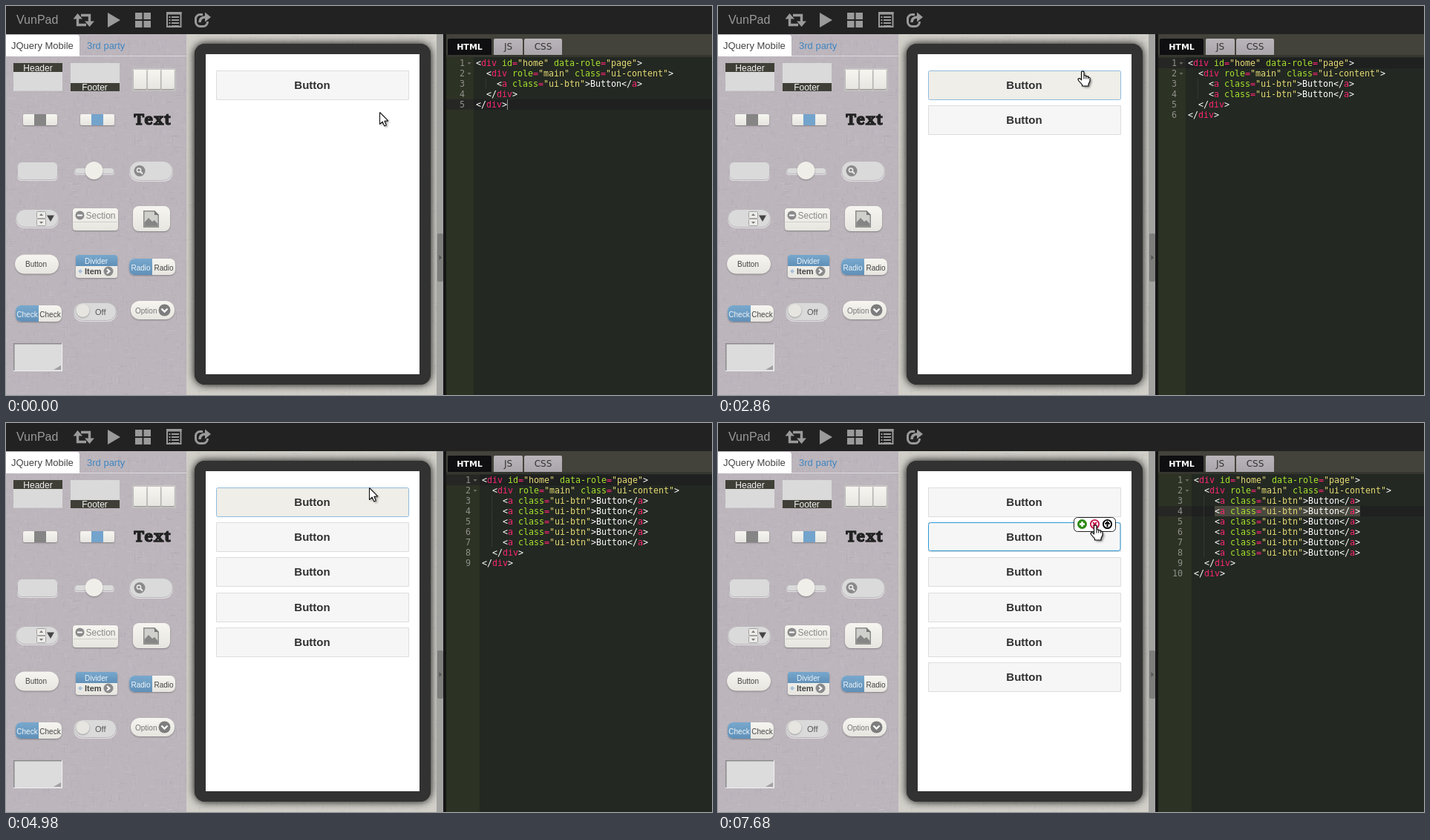
An HTML page with a canvas for the animation above (8 s loop, 951 px wide and 525 px high).

```html
<!DOCTYPE html>
<html lang="en">
<head>
<meta charset="utf-8">
<title>App builder</title>
<style>
html, body { margin: 0; width: 100%; height: 100%; overflow: hidden; background: #222; }
canvas { display: block; width: 100vw; height: 100vh; }
</style>
</head>
<body>
<canvas id="stage" width="951" height="525"></canvas>
<script>
const W = 951, H = 525, LOOP = 8000, TICK = 60;
const SANS = '"Liberation Sans", Arial, sans-serif';
const MONO = '11.63px "DejaVu Sans Mono", monospace';
const CREAM = '#efeee8', BLUE = '#2a97d6', GREY = '#8a8a8a';
const stage = document.getElementById('stage').getContext('2d');
let g = stage;

// ---------- drawing helpers ----------
function rect(x, y, w, h, fill) { g.fillStyle = fill; g.fillRect(x, y, w, h); }

function round(x, y, w, h, r, fill, line) {
  g.beginPath();
  g.roundRect(x, y, w, h, r);
  if (fill) { g.fillStyle = fill; g.fill(); }
  if (line) { g.strokeStyle = line; g.lineWidth = 1; g.stroke(); }
}

function disc(x, y, r, fill, line, width = 1) {
  g.beginPath();
  g.arc(x, y, r, 0, Math.PI * 2);
  if (fill) { g.fillStyle = fill; g.fill(); }
  if (line) { g.strokeStyle = line; g.lineWidth = width; g.stroke(); }
}

function trace(points) {
  g.beginPath();
  points.forEach(([x, y]) => g.lineTo(x, y));
}

function poly(points, fill) { trace(points); g.closePath(); g.fillStyle = fill; g.fill(); }

function stroke(points, color, width) {
  trace(points);
  g.strokeStyle = color;
  g.lineWidth = width;
  g.stroke();
}

function text(str, x, y, font, color, align = 'left') {
  g.font = font;
  g.fillStyle = color;
  g.textAlign = align;
  g.fillText(str, x, y);
}

const label = (str, x, y, size, color, align) => text(str, x, y, `${size}px ${SANS}`, color, align);

function vertical(y0, y1, ...colors) {
  const fill = g.createLinearGradient(0, y0, 0, y1);
  colors.forEach((c, i) => fill.addColorStop(i / (colors.length - 1), c));
  return fill;
}

function shadowed(color, blur, dx, dy, draw) {
  g.save();
  g.shadowColor = color;
  g.shadowBlur = blur;
  g.shadowOffsetX = dx;
  g.shadowOffsetY = dy;
  draw();
  g.restore();
}

// ---------- fixed scenery ----------
function linen(x, y, w, h, base, seed) {
  const rnd = () => (seed = (seed * 16807) % 2147483647) / 2147483647;
  rect(x, y, w, h, base);
  g.save();
  g.beginPath();
  g.rect(x, y, w, h);
  g.clip();
  for (let i = 0; i < w * h / 45; i++) {
    const tone = rnd() < 0.5 ? 'rgba(255,255,255,.07)' : 'rgba(90,80,95,.05)';
    const len = 2 + rnd() * 7, flat = rnd() < 0.5;
    rect(x + Math.floor(rnd() * w), y + Math.floor(rnd() * h), flat ? len : 1, flat ? 1 : len, tone);
  }
  g.restore();
}

function topBar() {
  const ink = '#9a9a9a';
  rect(0, 0, W, 38, '#222222');
  label('VunPad', 14, 24, 16, ink);
  stroke([[96.5, 16], [96.5, 25.5], [108, 25.5]], ink, 3.4);
  poly([[96.5, 10], [103, 17.5], [90.5, 17.5]], ink);
  stroke([[101, 12.5], [112.5, 12.5], [112.5, 21]], ink, 3.4);
  poly([[112.5, 28], [106, 20.5], [119, 20.5]], ink);
  poly([[137, 9], [154, 19], [137, 29]], ink);
  for (const x of [174, 185.5]) for (const y of [9, 20]) rect(x, y, 9.5, 9, ink);
  g.strokeStyle = ink;
  g.lineWidth = 2;
  g.strokeRect(217, 9, 18.5, 19);
  rect(216, 8, 20.5, 3.5, ink);
  for (let y = 14; y < 27; y += 4) {
    rect(219.5, y, 2, 2, ink);
    rect(223, y, 10, 2, ink);
  }
  g.beginPath();
  g.moveTo(265, 11.5);
  g.arcTo(255.5, 11.5, 255.5, 20, 6);
  g.arcTo(255.5, 27.5, 263, 27.5, 6);
  g.arcTo(271.5, 27.5, 271.5, 20, 6);
  g.lineTo(271.5, 21);
  g.lineWidth = 3;
  g.stroke();
  g.beginPath();
  g.moveTo(261, 22);
  g.quadraticCurveTo(261, 15, 269, 15);
  g.lineWidth = 3.6;
  g.stroke();
  poly([[268, 8.5], [276, 15], [268, 21.5]], ink);
}

function raised(x, y, w, h, r) {
  shadowed('rgba(0,0,0,.3)', 2, 0, 1, () => round(x, y, w, h, r, vertical(y, y + h, '#f6f5f0', '#e6e5df')));
}

function sunken(x, y, w, h, r) {
  round(x, y + 1, w, h, r, 'rgba(255,255,255,.6)');
  round(x + .5, y + .5, w - 1, h - 1, r, '#dadada', '#b9b6b9');
}

function slimBar(x, middle) {
  raised(x, 146, 46, 15, 2);
  rect(x + 15, 146, 16, 15, middle);
}

function pair(x, y, word) {
  raised(x, y, 62, 22, 7);
  round(x, y, 31, 22, [7, 0, 0, 7], vertical(y, y + 22, '#78a8cd', '#6090b8'));
  label(word, x + 15.5, y + 15.5, 10, '#eef4f8', 'center');
  label(word, x + 46.5, y + 15.5, 10, '#444', 'center');
}

function slabWord() {
  g.save();
  g.letterSpacing = '1px';
  text('Text', 197.5, 160, '900 20.5px "Noto Serif", serif', '#222', 'center');
  g.strokeStyle = '#222';
  g.lineWidth = 1.5;
  g.strokeText('Text', 197.5, 160);
  g.restore();
}

function palette() {
  linen(0, 38, 243, 487, '#bcb5bc', 7);
  rect(0, 67, 243, 1, '#dcd9dc');
  round(0, 39, 99, 29, [0, 4, 0, 0], '#fff');
  label('JQuery Mobile', 7, 58, 13, '#444');
  label('3rd party', 109, 58, 13, '#3f86c0');

  for (const x of [10, 87]) {
    rect(x, 77, 66, 38, '#dadada');
    rect(x, 114, 66, 1, '#cfcccf');
  }
  rect(10, 77, 66, 12, '#3f3f37');
  label('Header', 43, 88, 12, '#f4f4f4', 'center');
  rect(87, 104, 66, 11, '#3f3f37');
  label('Footer', 119.5, 114, 12, '#f4f4f4', 'center');
  round(170, 84, 59, 31, 2, '#c9c7c6');
  for (let i = 0; i < 3; i++) raised(172 + i * 18.7, 86, 17.5, 26, 1);

  slimBar(23, '#858585');
  slimBar(100, '#73a4cc');
  slabWord();

  sunken(15, 210, 55, 25, 6);
  sunken(92, 218, 54, 9, 4);
  shadowed('rgba(0,0,0,.3)', 2, 0, 1, () => disc(118.5, 222, 12, CREAM));
  sunken(166, 209, 59, 27, 13);
  disc(180, 222.5, 7.5, GREY);
  disc(179, 221.5, 2.6, null, '#eee', 1.5);
  stroke([[181, 223.5], [184, 226.5]], '#eee', 2);

  sunken(13, 274, 58, 25, 12);
  for (const y of [277, 287]) {
    round(41.5, y + .5, 12, 9, 1, '#ecebe7', '#a5a3a5');
    const d = y === 277 ? 1 : -1;
    poly([[45, y + 5 + d], [50, y + 5 + d], [47.5, y + 5 - 2 * d]], '#777');
  }
  poly([[55, 282.5], [65, 282.5], [60, 291]], '#444');
  raised(90, 273, 61, 30, 4);
  rect(91, 291, 59, 1, '#cfcec9');
  disc(99.5, 282.5, 6, GREY);
  rect(96, 281.5, 7, 2, '#fff');
  label('Section', 107.5, 287, 12, '#888');
  raised(171, 270, 50, 34, 8);
  poly([[185, 276], [200, 276], [206, 282], [206, 299], [185, 299]], '#8b8b8b');
  poly([[186.5, 277.5], [199, 277.5], [204.5, 283], [204.5, 297.5], [186.5, 297.5]], '#cfcfcc');
  poly([[186.5, 297.5], [186.5, 292], [192, 286], [197, 291], [200, 289], [204.5, 294], [204.5, 297.5]], '#858585');
  poly([[200, 276], [206, 282], [200, 282]], '#777');

  raised(12, 335.5, 59, 26, 13);
  label('Button', 40.5, 352, 10, '#444', 'center');
  raised(94, 336, 56, 31, 3);
  round(94, 336, 56, 15, [3, 3, 0, 0], vertical(336, 351, '#77a7cc', '#6090b8'));
  label('Divider', 121.5, 348, 10, '#eef4f8', 'center');
  poly([[97, 358], [100, 355], [103, 358], [100, 361]], '#a9bfd9');
  text('Item', 106, 362, `bold 11px ${SANS}`, '#444');
  disc(138, 358, 6.5, GREY);
  stroke([[136, 355], [139.5, 358], [136, 361]], '#fff', 2);
  pair(166, 341, 'Radio');

  pair(13, 404, 'Check');
  sunken(91, 400, 58, 25, 12);
  shadowed('rgba(0,0,0,.3)', 2, 0, 1, () => disc(103.5, 411, 9, '#e6e5e0'));
  label('Off', 120, 417, 11, '#555');
  raised(168, 398, 59, 25, 12);
  label('Option', 174, 414.5, 10, '#777');
  disc(213.5, 410.5, 8, '#7d7d7d');
  stroke([[209.5, 408.5], [213.5, 412.5], [217.5, 408.5]], '#fff', 2.4);

  rect(10, 455, 66, 38, '#f0eff0');
  rect(10, 455, 65, 37, '#8c898c');
  rect(11.5, 456.5, 63.5, 35.5, '#dcdcdc');
  poly([[74, 485], [74, 491], [64, 491]], '#a3a0a3');
}

function device() {
  linen(243, 38, 338, 487, '#d1cfc8', 99);
  shadowed('#000', 12, 0, 0, () => round(254, 51, 318, 460, 14, '#333'));
  round(254, 51, 318, 460, 14, '#323232');
  rect(269, 65, 288, 432, '#fff');
  rect(580, 38, 10, 487, '#a2a2a0');
  round(581, 307, 8, 65, 2, '#7d7d7b');
  poly([[583.5, 336], [587, 339.5], [583.5, 343]], '#555');
  rect(589, 38, 4, 487, '#161616');
}

function editorTab(x, w, name, active) {
  round(x, 44, w, 22, [2, 2, 0, 0], active ? '#0f0f12' : vertical(44, 66, '#bab5ba', '#aaa5aa'));
  const font = active ? 'bold 11px' : '12px';
  text(name, x + w / 2, 59, `${font} "DejaVu Sans", sans-serif`, active ? '#fff' : '#333', 'center');
}

function editorFrame() {
  rect(593, 38, W - 593, 32, '#43433b');
  rect(593, 66, W - 593, 3, '#35362f');
  editorTab(595, 59, 'HTML', true);
  editorTab(657, 39, 'JS');
  editorTab(698, 51, 'CSS');
  rect(593, 69, W - 593, H - 69, '#232822');
}

const scenery = document.createElement('canvas');
scenery.width = W;
scenery.height = H;
g = scenery.getContext('2d');
topBar();
palette();
device();
editorFrame();
g = stage;

// ---------- timeline ----------
const steps = [[0, { x: 503, y: 143, hand: 0, n: 1, line: 5, sel: -1, hover: -1, focus: -1, saving: 0 }]];
const at = (t, patch) => steps.push([t, patch]);

function move(t, count, from, to, extra) {
  for (let i = 1; i <= count; i++) {
    const k = i / count;
    const x = Math.round(from[0] + (to[0] - from[0]) * k);
    const y = Math.round(from[1] + (to[1] - from[1]) * k);
    at(t + (i - 1) * TICK, { x, y, ...extra(y) });
  }
}

function duplicate(t, n) {
  at(t, { n, sel: -1, line: 1, hover: 0, focus: 0, saving: 0 });
  at(t + TICK, { sel: 0, line: 3, hand: 0 });
}

move(530, 6, [503, 143], [484, 110], y => ({ hover: y < 127 ? 0 : -1 }));
at(1490, { focus: 0 });
at(1550, { sel: 0, line: 3 });
at(2080, { x: 485, y: 97 });
move(2140, 3, [485, 97], [489, 87], () => ({ hand: 1, hover: -1 }));
duplicate(2860, 2);
at(3180, { saving: 1 });
at(3380, { hand: 1, hover: -1 });
duplicate(3510, 3);
at(3630, { hand: 1 });
at(3890, { saving: 1 });
at(4080, { hover: -1 });
duplicate(4160, 4);
at(4460, { saving: 1 });
at(4790, { hover: -1 });
duplicate(4980, 5);
at(5300, { saving: 1 });
at(5500, { hand: 1, hover: -1 });
at(5700, { hand: 0 });
duplicate(5700, 6);
at(6090, { saving: 1 });
move(6350, 5, [489, 87], [500, 152], y => ({ saving: y < 120 ? 1 : 0, hover: y < 127 ? 0 : y > 134 ? 1 : -1 }));
at(6850, { focus: 1 });
at(6980, { sel: 1, line: 4 });
move(7440, 5, [500, 152], [506, 137], y => (y < 147 ? { hand: 1, hover: -1 } : {}));

function stateAt(t) {
  const s = {};
  for (const [start, patch] of steps) if (start <= t) Object.assign(s, patch);
  return s;
}

// ---------- moving parts ----------
const buttonY = i => 87 + 47.2 * i;

function appButton(i, s) {
  const y = Math.round(buttonY(i));
  const selected = s.sel === i, focused = s.focus === i && !selected;
  round(283.5, y + .5, 259, 39, focused ? 2 : 0, s.hover === i ? CREAM : '#f6f6f6', focused ? '#8fbbdf' : '#dddddd');
  if (selected) round(283.5, y + .5, 258.5, 38, 3, null, BLUE);
  const font = `bold 15px ${SANS}`;
  text('Button', 412.5, y + 26, font, '#fff', 'center');
  text('Button', 412.5, y + 25, font, '#2f2f2f', 'center');
}

function toolbar(y) {
  const cy = y + 9.5;
  round(479.5, y + .5, 56, 19, 5, '#fff', '#222');
  disc(490.5, cy, 6.5, '#2d8a12');
  stroke([[487, cy], [494, cy]], '#fff', 2.6);
  stroke([[490.5, cy - 3.5], [490.5, cy + 3.5]], '#fff', 2.6);
  disc(507.5, cy, 5.6, '#fff', '#c4184a', 1.9);
  stroke([[505, cy - 2.5], [510, cy + 2.5]], '#c4184a', 1.9);
  stroke([[510, cy - 2.5], [505, cy + 2.5]], '#c4184a', 1.9);
  disc(524.5, cy, 5.6, '#fff', '#000', 1.9);
  stroke([[524.5, cy + 4], [524.5, cy - 2]], '#000', 2);
  stroke([[521.5, cy], [524.5, cy - 3], [527.5, cy]], '#000', 1.8);
}

const PINK = '#f92672', LIME = '#a6e22e', SAND = '#e6db74', WHITE = '#ffffff';
const openTag = (name, ...attrs) => [
  ['<', WHITE], [name, PINK],
  ...attrs.flatMap(([key, value]) => [[' ' + key, LIME], ['=', PINK], [`"${value}"`, SAND]]),
  ['>', WHITE]
];
const closeTag = name => [['</', WHITE], [name, PINK], ['>', WHITE]];

function codeLines(n) {
  const link = [4, [...openTag('a', ['class', 'ui-btn']), ['Button', WHITE], ...closeTag('a')]];
  return [
    [0, openTag('div', ['id', 'home'], ['data-role', 'page'])],
    [2, openTag('div', ['role', 'main'], ['class', 'ui-content'])],
    ...Array(n).fill(link),
    [2, closeTag('div')],
    [0, closeTag('div')]
  ];
}

function editor(s) {
  const wide = s.n >= 5 ? 8 : 0;
  const left = 633 + wide, edge = 630 + wide, CHAR = 7;
  rect(593, 69, edge - 593, H - 69, '#2c3224');
  const active = 70 + (s.line - 1) * 14;
  rect(593, active, edge - 593, 14, '#262724');
  rect(edge, active, W - edge, 14, '#1f2020');
  if (s.sel >= 0) rect(left + 28, active, 28 * CHAR, 14, '#49483e');

  codeLines(s.n).forEach(([indent, parts], i) => {
    const top = 70 + i * 14;
    text(i + 1, 618 + wide, top + 11, MONO, '#8f908a', 'right');
    if (i < 2) poly([[621.5 + wide, top + 6], [626.5 + wide, top + 6], [624 + wide, top + 9]], '#6c6d66');
    if (indent === 4) for (let y = 0; y < 14; y += 2) rect(left + 13, top + y, 1, 1, '#45483f');
    let col = indent;
    for (const [str, color] of parts) {
      text(str, left + col * CHAR, top + 11, MONO, color);
      col += str.length;
    }
  });
  if (s.line === 5) rect(left + 42, active, 1, 14, '#8f8f88');
}

function pointer(x, y, hand) {
  g.save();
  g.translate(x + .5, y + .5);
  g.lineJoin = 'round';
  const shade = draw => shadowed('rgba(0,0,0,.45)', 3, 2, 2, draw);
  if (hand) {
    const outline = [[0, 1.5], [1, .5], [2.5, .5], [3.5, 1.5], [3.5, 6.5], [6, 6.5], [7, 7.5], [9, 7.5],
      [9.5, 8.5], [11, 9], [11.5, 10], [11.5, 14], [9.5, 18], [9.5, 20.5], [1, 20.5], [1, 18.5],
      [-4, 13], [-4.5, 11], [-3, 10], [-1, 11], [0, 12.5]];
    shade(() => poly(outline, '#fff'));
    stroke([...outline, outline[0]], '#000', 1.1);
    for (const px of [3.5, 6.3, 9]) stroke([[px, 7], [px, 11]], '#000', 1);
  } else {
    const outline = [[0, 0], [0, 16], [3.7, 12.7], [6.3, 18.4], [8.8, 17.3], [6.4, 11.7], [11.2, 11.4]];
    shade(() => poly(outline, '#fff'));
    stroke([...outline, outline[0]], '#111', 1.1);
  }
  g.restore();
}

function render(now) {
  const s = stateAt(now % LOOP);
  g.drawImage(scenery, 0, 0);
  if (s.saving) label('Saving...', 654.5, 22, 14, '#fff');
  for (let i = 0; i < s.n; i++) appButton(i, s);
  if (s.sel >= 0) toolbar(Math.ceil(buttonY(s.sel)) - 8);
  editor(s);
  pointer(s.x, s.y, s.hand);
}

function loop() {
  render(performance.now());
  requestAnimationFrame(loop);
}
loop();
</script>
</body>
</html>
```
